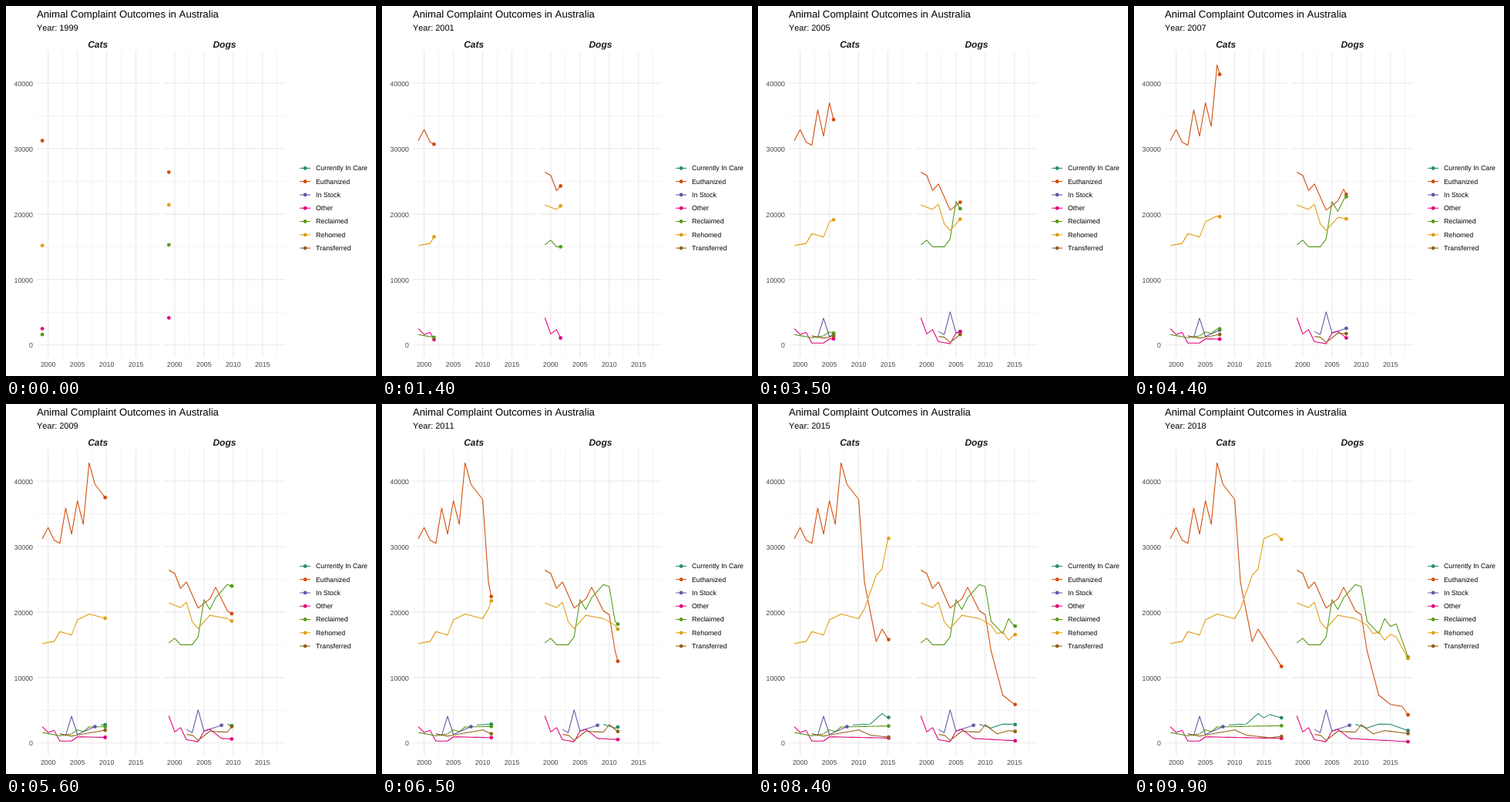
These frames come from a looping animation (480 by 480 pixels, 10000 ms). An HTML page:

```html
<!DOCTYPE html>
<html lang="en">
<head>
<meta charset="utf-8">
<title>Animal Complaint Outcomes</title>
<style>
  html, body { margin: 0; width: 100%; height: 100%; overflow: hidden; background: #fff; }
  svg { display: block; width: 480px; height: 480px; }
  text {
    font-family: "Liberation Sans", Arial, sans-serif; font-size: 8.8px;
    font-kerning: none; text-rendering: geometricPrecision;
  }
  .title { font-size: 13.2px; }
  .sub { font-size: 11px; }
  .strip { font-size: 12px; font-weight: bold; font-style: italic; fill: #1a1a1a; }
  .axis { fill: #444; }
  .grid { stroke: #e8e8e8; stroke-width: 1.07; }
  .minor { stroke-width: .53; }
  .line { fill: none; stroke-width: 1.07; stroke-linejoin: round; }
</style>
</head>
<body>
<svg id="chart" viewBox="0 0 480 480"></svg>
<script>
const FIRST = 1999, LAST = 2018, FRAMES = 100, FRAME_MS = 100;
const PANEL_STEP = 164.2, LEFT = 39.9, RIGHT = 198.5, TOP = 58.5, BOTTOM = 456;
const _ = null;

// Turning points in thousands, one slot per year; gaps (_) run straight
const outcomes = [
  { name: "Currently In Care", color: "#228b69", start: 2009,
    cats: [2.75, _, _, 2.9, _, 4.5, 3.85, 4.35, _, 3.85],
    dogs: [2.85, _, 2.3, _, 2.9, _, 2.85, _, _, 1.9] },
  { name: "Euthanized", color: "#d14b0a", start: FIRST,
    cats: [31.2, 32.9, 31, 30.5, 35.9, 31.9, 37, 33.4, 42.8, 39.5, _, 37.2, 24.5, _, 15.5, 17.4, _, _, _, 11.7],
    dogs: [26.4, 25.9, 23.6, 24.6, _, 20.6, _, 22, 23.8, _, 20.2, 19.6, 14.1, _, 7.3, _, 5.9, _, 5.6, 4.3] },
  { name: "In Stock", color: "#6259a6", start: 2002,
    cats: [1.4, 1.15, 4.1, 1.3, _, _, 2.5],
    dogs: [2.05, 1.6, 5.05, 1.85, _, _, 2.7] },
  { name: "Other", color: "#e0007b", start: FIRST,
    cats: [2.5, 1.6, 1.95, .3, _, .3, .95, _, _, _, _, _, _, _, _, _, _, _, _, .7],
    dogs: [4.15, 1.7, 2.35, .5, _, .2, 1.8, 2.1, _, .7, _, _, _, _, _, _, _, _, _, .2] },
  { name: "Reclaimed", color: "#559a18", start: FIRST,
    cats: [1.6, _, _, 1.1, _, 1.4, 2, 1.75, 2.45, _, _, _, _, _, _, _, _, _, _, 2.65],
    dogs: [15.3, 16, 15, _, 15, 16.2, 21.9, 20.4, 22.2, _, 24.2, 23.9, 18.6, _, 16.7, 19, 17.8, 18.2, _, 13.1] },
  { name: "Rehomed", color: "#e09e0f", start: FIRST,
    cats: [15.2, _, 15.5, 17, _, 16.5, 18.8, _, 19.7, _, _, 19, 20.5, _, 25.6, 26.6, 31.2, _, 32, 31.1],
    dogs: [21.4, _, 20.7, 21.5, 18.5, 17.5, _, 19.5, _, _, 19, _, 18, 16.7, 17, 15.7, 16.6, 16.2, _, 12.9] },
  { name: "Transferred", color: "#946118", start: 2002,
    cats: [1.4, _, 1.05, _, _, _, _, _, 2, _, 1.2, _, _, _, .8, _, 1],
    dogs: [1.3, 1.2, .4, _, 1.8, _, _, 1.65, 2.8, _, 1.4, _, 1.9, _, _, _, 1.45] }
];

const svg = document.getElementById("chart");
const xOf = year => 47.1 + (year - FIRST) * 7.588;
const yOf = thousands => 439.8 - thousands * 8.495;
const mix = (a, b, t) => a + (b - a) * t;

function add(tag, attrs, content) {
  const el = document.createElementNS("http://www.w3.org/2000/svg", tag);
  for (const key in attrs) el.setAttribute(key, attrs[key]);
  if (content) el.textContent = content;
  return svg.appendChild(el);
}
const label = (cls, x, y, content, anchor = "start") =>
  add("text", { class: cls, x, y, "text-anchor": anchor }, content);
const rule = (x1, y1, x2, y2, cls) => add("line", { x1, y1, x2, y2, class: cls });

function drawPanel(name, dx) {
  const column = (year, cls) => rule(xOf(year) + dx, TOP, xOf(year) + dx, BOTTOM, cls);
  const row = (value, cls) => rule(LEFT + dx, yOf(value), RIGHT + dx, yOf(value), cls);
  for (let v = 5; v < 40; v += 10) row(v, "grid minor");
  for (let y = 2002.5; y < LAST; y += 5) column(y, "grid minor");
  for (let v = 0; v <= 40; v += 10) row(v, "grid");
  for (let y = 2000; y < LAST; y += 5) {
    column(y, "grid");
    label("axis", xOf(y) + dx, 467.8, y, "middle");
  }
  label("strip", (LEFT + RIGHT) / 2 + dx, 54, name, "middle");
}

function fillGaps(values) {
  return values.map((v, i) => {
    if (v !== _) return v;
    let a = i, b = i;
    while (values[a] === _) a--;
    while (values[b] === _) b++;
    return mix(values[a], values[b], (i - a) / (b - a));
  });
}

function makeSeries(animal, dx) {
  const list = outcomes.map(o => ({
    start: o.start, color: o.color, dx,
    values: fillGaps(o[animal]),
    line: add("polyline", { class: "line", stroke: o.color })
  }));
  for (const s of list) s.dot = add("circle", { r: 2.4, fill: s.color });
  return list;
}

function drawSeries({ start, values, dx, line, dot }, now) {
  const shown = now >= start;
  line.style.display = dot.style.display = shown ? "" : "none";
  if (!shown) return;
  const end = values.length - 1;
  const pos = Math.min(now - start, end);
  const i = Math.floor(pos);
  const place = (k, v) => [xOf(start + k) + dx, yOf(v)];
  const head = place(pos, mix(values[i], values[Math.min(i + 1, end)], pos - i));
  const trail = values.slice(0, i + 1).map((v, k) => place(k, v));
  line.setAttribute("points", [...trail, head].join(" "));
  dot.setAttribute("cx", head[0]);
  dot.setAttribute("cy", head[1]);
}

label("title", LEFT, 15, "Animal Complaint Outcomes in Australia");
const yearLabel = label("sub", LEFT, 32, "Year: " + FIRST);
drawPanel("Cats", 0);
drawPanel("Dogs", PANEL_STEP);
for (let v = 0; v <= 40; v += 10) label("axis", 35, yOf(v) + 3.66, String(v * 1000), "end");

outcomes.forEach(({ name, color }, i) => {
  const y = 210.4 + i * 17.28;
  add("line", { x1: 381.2, y1: y, x2: 395, y2: y, class: "line", stroke: color });
  add("circle", { cx: 388.1, cy: y, r: 2.4, fill: color });
  label("", 402, y + 2.9, name);
});

const series = [...makeSeries("cats", 0), ...makeSeries("dogs", PANEL_STEP)];
const origin = performance.now();
let last = -1;

function tick() {
  const frame = Math.floor((performance.now() - origin) / FRAME_MS) % FRAMES;
  if (frame !== last) {
    last = frame;
    const now = mix(FIRST, LAST, frame / (FRAMES - 1));
    yearLabel.textContent = "Year: " + Math.floor(now);
    series.forEach(s => drawSeries(s, now));
  }
  requestAnimationFrame(tick);
}
tick();
</script>
</body>
</html>
```
